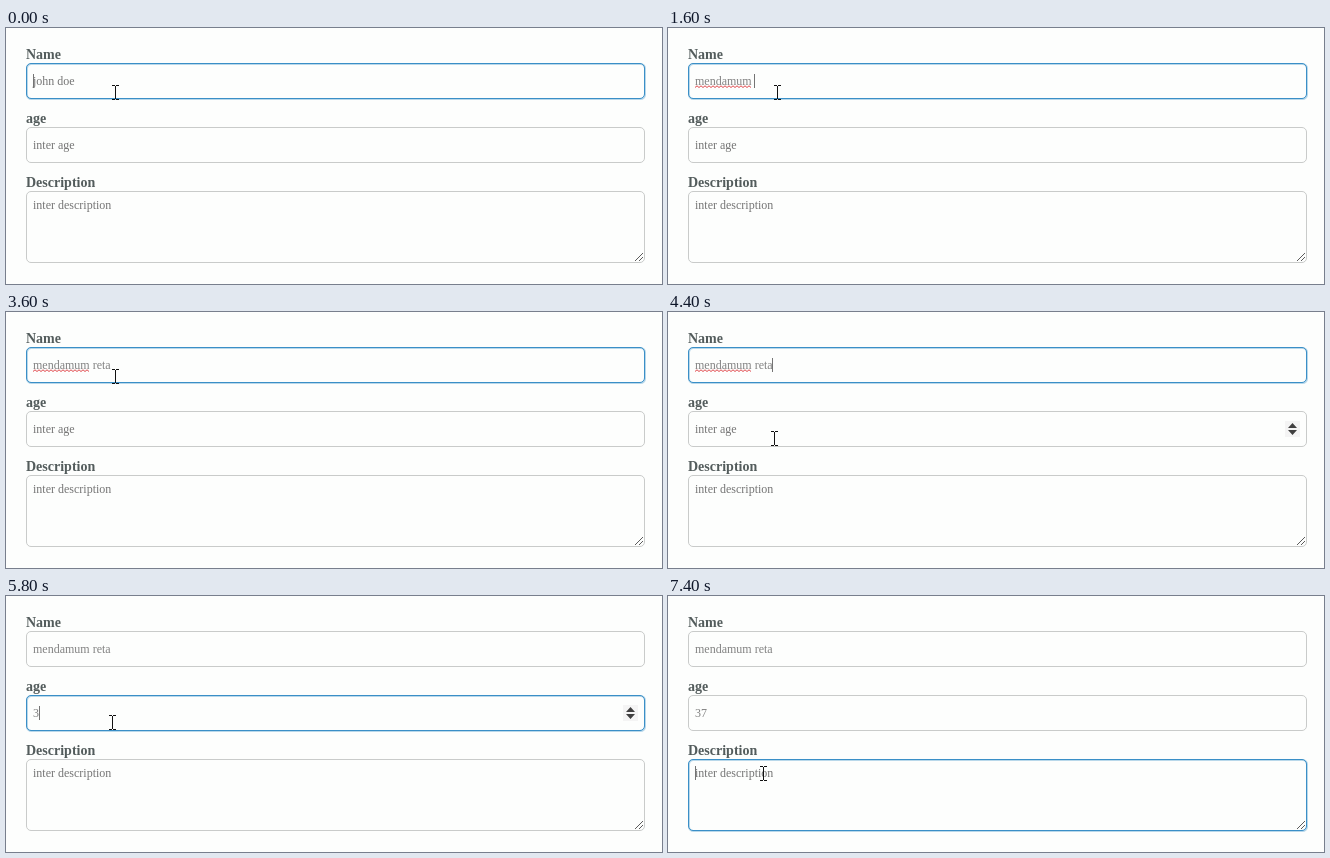
An HTML page that plays this animation: 656x256 px, repeating every 8000 ms.

```html
<!DOCTYPE html>
<html lang="en">
<head>
<meta charset="utf-8">
<title>Form</title>
<style>
html, body { margin: 0; width: 100%; height: 100%; overflow: hidden; background: #fdfefd; }
svg { display: block; }
text { font: 12px "Liberation Serif", "Times New Roman", serif; fill: #757575; white-space: pre; }
.label { font-size: 14px; font-weight: bold; fill: #535c5c; }
.typed { fill: #828282; }
.box { fill: none; stroke: #c9cbca; }
.box.focus { stroke: #3a8fc7; }
.ring { fill: none; stroke: #3a8fc7; stroke-width: 2; opacity: .35; }
</style>
</head>
<body>
<svg id="stage" width="656" height="256" viewBox="0 0 656 256">
  <g id="fields"></g>
  <path id="grip" d="M629 233 L637 225 M633 233 L637 229" fill="none" stroke="#5c5c5c"/>
  <g id="spinner">
    <rect x="617" y="109" width="15" height="16" fill="#f4f4f4"/>
    <path d="M620 116 L624.5 111 L629 116 Z M620 118 L624.5 123 L629 118 Z" fill="#404040"/>
  </g>
  <path id="squiggle" fill="none" stroke="#e0484c"/>
  <rect id="caret" width="1" height="14" fill="#747474"/>
  <path id="mouse" d="M-3 -6.5 H0 M1 -6.5 H4 M.5 -6 V7 M-3 7.5 H0 M1 7.5 H4" fill="none" stroke="#111"/>
</svg>
<script>
const LOOP = 8000, STEP = 200, BLINK = 530, LEFT = 27;
const FIRST = "mendamum", FULL = FIRST + " reta";
const $ = id => document.getElementById(id);

function add(parent, tag, attrs, content = "") {
  const el = document.createElementNS("http://www.w3.org/2000/svg", tag);
  for (const key in attrs) el.setAttribute(key, attrs[key]);
  el.textContent = content;
  parent.appendChild(el);
  return el;
}

function show(el, on) {
  el.setAttribute("visibility", on ? "visible" : "hidden");
}

function makeField(label, hint, top, height) {
  const g = $("fields");
  const base = top + (height > 40 ? 18 : 22);
  add(g, "text", { class: "label", x: 20, y: top - 4 }, label);
  return {
    base, hint,
    ring: add(g, "rect", { class: "ring", x: 21, y: top + 1, width: 618, height: height - 1, rx: 4.5 }),
    box: add(g, "rect", { class: "box", x: 20.5, y: top + .5, width: 618, height: height - 1, rx: 4.5 }),
    text: add(g, "text", { x: LEFT, y: base })
  };
}

const fields = [
  makeField("Name", "john doe", 35, 36),
  makeField("age", "inter age", 99, 36),
  makeField("Description", "inter description", 163, 72)
];

// [time, field, value]
const actions = [
  [-350, 0, ""],
  [800, 0, FULL.slice(0, 1)],
  [1000, 0, FULL.slice(0, 3)],
  [1200, 0, FULL.slice(0, 5)],
  [1400, 0, FULL.slice(0, 7)],
  [1600, 0, FULL.slice(0, 9)],
  [2600, 0, FULL.slice(0, 11)],
  [3000, 0, FULL],
  [4600, 1, ""],
  [5800, 1, "3"],
  [6120, 1, "37"],
  [7400, 2, ""]
];

function ease(t, from, to) {
  const p = Math.min(1, Math.max(0, (t - from) / (to - from)));
  return p * p * (3 - 2 * p);
}

function squigglePath(width) {
  let d = `M${LEFT} 59.5`;
  for (let x = 2, up = true; x <= width; x += 2, up = !up) d += ` L${LEFT + x} ${up ? 57.8 : 59.5}`;
  return d;
}

function draw(time) {
  const t = Math.floor(time / STEP) * STEP;
  const values = ["", "", ""];
  let last = 0, focus = 0;
  for (const [at, field, value] of actions) {
    if (at > t) break;
    values[field] = value;
    focus = field;
    last = at;
  }

  fields.forEach((f, i) => {
    f.text.textContent = values[i] || f.hint;
    f.text.setAttribute("class", values[i] ? "typed" : "");
    f.box.setAttribute("class", i === focus ? "box focus" : "box");
    show(f.ring, i === focus);
  });

  const active = fields[focus];
  const width = values[focus] ? active.text.getComputedTextLength() : 0;
  $("caret").setAttribute("x", Math.floor(LEFT + width));
  $("caret").setAttribute("y", active.base - 11);
  show($("caret"), Math.floor((t - last) / BLINK) % 2 === 0);

  const misspelt = focus === 0 && values[0].length > FIRST.length;
  show($("squiggle"), misspelt);
  if (misspelt) $("squiggle").setAttribute("d", squigglePath(fields[0].text.getSubStringLength(0, FIRST.length)));

  const down = ease(t, 3600, 4400), on = ease(t, 6600, 7200);
  const x = Math.round(109 - 3 * down - 11 * on);
  const y = Math.round(64 + 62 * down + 51 * on);
  $("mouse").setAttribute("transform", `translate(${x} ${y})`);
  show($("spinner"), focus === 1 || (y >= 99 && y < 135));
}

const start = performance.now();
function tick() {
  draw((performance.now() - start) % LOOP);
  requestAnimationFrame(tick);
}
tick();
</script>
</body>
</html>
```
